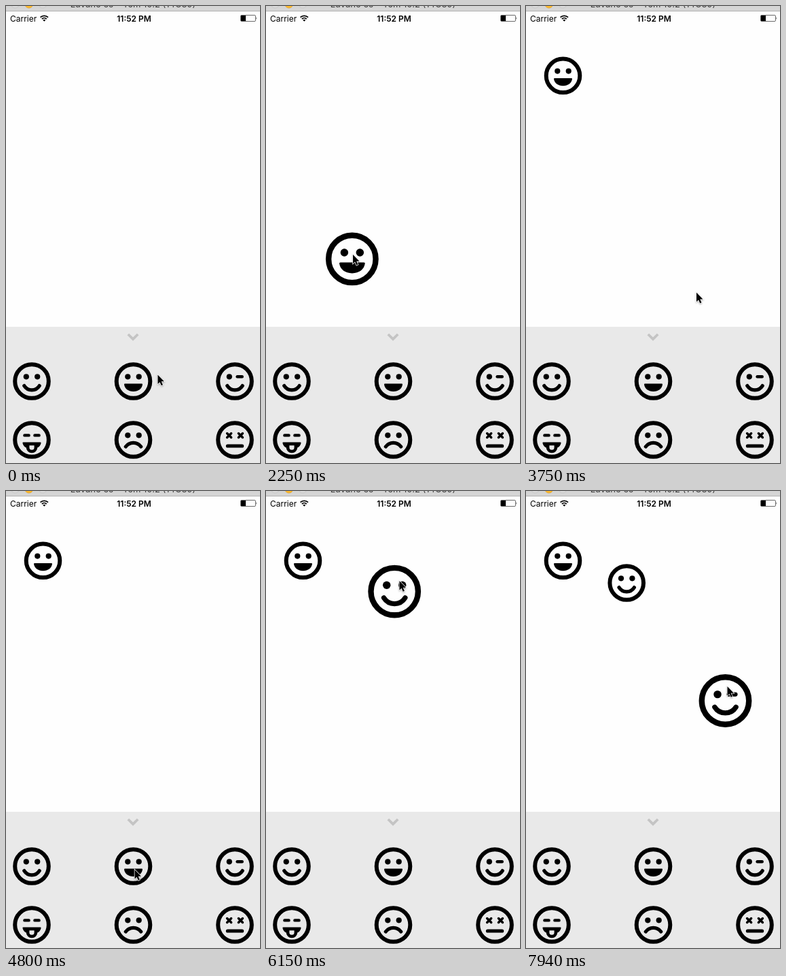
An HTML page for the animation above (8 s loop, 374 px wide and 671 px high).

```html
<!DOCTYPE html>
<html lang="en">
<head>
<meta charset="utf-8">
<title>Emoji stickers</title>
<style>
  html, body { margin: 0; width: 100%; height: 100%; overflow: hidden; background: #fefefe; }
  svg { display: block; }
  text { font-family: Inter, Roboto, "Liberation Sans", sans-serif; font-size: 12px; }
  .line { fill: none; stroke: #000; stroke-width: 5.2; stroke-linecap: round; }
  .thin { stroke-width: 4.4; }
</style>
</head>
<body>
<svg width="374" height="671" viewBox="0 0 374 671">
  <defs>
    <circle id="ring" r="24.8" fill="none" stroke="#000" stroke-width="6"/>
    <circle id="eye" r="4.1"/>
    <g id="eyes"><use href="#eye" x="-8.2" y="-6.7"/><use href="#eye" x="8.2" y="-6.7"/></g>
    <path id="smile" class="line" d="M-11.2 6.6A13.2 13.2 0 0 0 11.2 6.6"/>
    <path id="cross" class="line" style="stroke-width:3.5" d="M-3 -3L3 3M3 -3L-3 3"/>

    <g id="happy"><use href="#ring"/><use href="#eyes"/><use href="#smile"/></g>
    <g id="grin"><use href="#ring"/><use href="#eyes"/>
      <path d="M-12.4 3.6H12.4Q13.6 3.6 13.5 4.8C12.6 11 7.5 15 0 15S-12.6 11 -13.5 4.8Q-13.6 3.6 -12.4 3.6Z"/></g>
    <g id="wink"><use href="#ring"/><use href="#eye" x="-8.2" y="-6.7"/><use href="#smile"/>
      <path class="line thin" d="M3.6 -6.7H10.7"/></g>
    <g id="tongue"><use href="#ring"/>
      <path class="line thin" d="M-10.6 -6.6H-4.4M4.4 -6.6H10.6"/>
      <path fill-rule="evenodd" d="M-12.6 3.6H12.6Q13.8 3.6 13.5 4.9Q12.4 9.4 8.2 11.6A8.2 7.6 0 0 1 -8.2 11.6Q-12.4 9.4 -13.5 4.9Q-13.8 3.6 -12.6 3.6ZM-3.6 8.2V11.2A3.6 3.6 0 0 0 3.6 11.2V8.2Z"/></g>
    <g id="sad"><use href="#ring"/><use href="#eyes"/>
      <path class="line" d="M-11.2 10A14 14 0 0 1 11.2 10"/></g>
    <g id="dizzy"><use href="#ring"/>
      <use href="#cross" x="-8.4" y="-6.5"/><use href="#cross" x="8.4" y="-6.5"/>
      <path class="line" d="M-10.6 9H10.6"/></g>
  </defs>

  <rect width="374" height="671" fill="#fefefe"/>

  <!-- window title bar -->
  <rect width="374" height="7" fill="#d5d5d5"/>
  <rect y="7" width="374" height="1" fill="#b4b4b4"/>
  <g stroke-width=".8">
    <circle cx="13.5" cy="-3" r="6" fill="#dadada" stroke="#c6c6c6"/>
    <circle cx="33.8" cy="-3" r="6" fill="#fdb92c" stroke="#e5a52b"/>
    <circle cx="54" cy="-3" r="6" fill="#dadada" stroke="#c6c6c6"/>
  </g>
  <text x="187" y="2" text-anchor="middle" style="font-size:13px" fill="#3c3c3c">Luvane 6s – Tem 10.2 (14C89)</text>

  <!-- status bar -->
  <text x="6" y="22.6">Carrier</text>
  <g fill="none" stroke="#000" stroke-width="1.8">
    <path d="M50.6 16.6A8.2 8.2 0 0 1 62 16.6"/>
    <path d="M52.9 19A4.9 4.9 0 0 1 59.7 19"/>
  </g>
  <path d="M56.3 22.8L54.3 20.6A2.9 2.9 0 0 1 58.3 20.6Z"/>
  <text x="188.6" y="22.6" text-anchor="middle" font-weight="600">11:52 PM</text>
  <rect x="345.5" y="13.5" width="22" height="9" rx="1.4" fill="none" stroke="#444" stroke-width=".8"/>
  <rect x="346" y="14" width="7" height="8"/>
  <path d="M368.6 16.2Q370 18 368.6 19.8Z"/>

  <!-- sticker panel -->
  <rect y="471" width="374" height="200" fill="#e9e9e9"/>
  <path d="M179.8 482L187 489L194.2 482" fill="none" stroke="#c4c4c4" stroke-width="3.8"/>
  <g id="panel"></g>
  <g id="stickers"></g>
  <path id="cursor" d="M0 0V14.6L3.3 11.6L5.7 17.2L8.1 16.1L5.7 10.7H10.3Z" stroke="#fff" stroke-width="1.6"
    paint-order="stroke" style="filter:drop-shadow(0 1px 1px #0005)"/>
</svg>
<script>
const LOOP = 8000, STEP = 150, LAST = 7940, BIG = 1.4;

// Stops of the pointer tip: [time, x, y]
const stops = [
  [0, 223.5, 541.5], [450, 259, 504], [1350, 189.5, 554], [1800, 189.5, 554],
  [2850, 40, 94], [3000, 49.5, 97], [3150, 55.7, 95.8], [3900, 286, 479],
  [4800, 189.5, 556], [5100, 50, 558], [6000, 194.6, 188], [6150, 196.5, 132],
  [6450, 155.5, 119.4], [6900, 264, 316], [7200, 264, 316], [7350, 365, 560],
  [7500, 320, 464], [7950, 296.5, 287]
];

// A sticker hangs on the pointer at its grip from lift to rest, then shrinks
const drags = [
  { icon: "grin", lift: 1950, rest: 3150, grip: [1.2, -6.5] },
  { icon: "happy", lift: 5250, rest: 6450, grip: [7.3, -15.6] },
  { icon: "wink", lift: 7500, rest: LOOP, grip: [3, -21] }
];

const byId = id => document.getElementById(id);

function addIcon(parent, icon) {
  const node = document.createElementNS("http://www.w3.org/2000/svg", "use");
  node.setAttribute("href", "#" + icon);
  byId(parent).append(node);
  return node;
}

function place(node, x, y, scale = 1) {
  node.setAttribute("transform", `translate(${x} ${y}) scale(${scale})`);
}

["happy", "grin", "wink", "tongue", "sad", "dizzy"].forEach((icon, i) =>
  place(addIcon("panel", icon), 38 + (i % 3) * 149.5, 551 + Math.floor(i / 3) * 86));

for (const d of drags) d.node = addIcon("stickers", d.icon);

// Halfway between linear and smoothstep
const ease = k => (k + k * k * (3 - 2 * k)) / 2;

function pointerAt(t) {
  const i = Math.max(1, stops.findIndex(s => s[0] >= t));
  const [t0, x0, y0] = stops[i - 1], [t1, x1, y1] = stops[i];
  const k = ease((t - t0) / (t1 - t0));
  return [x0 + (x1 - x0) * k, y0 + (y1 - y0) * k];
}

function draw(now) {
  const ms = now % LOOP;
  const t = ms >= LAST ? LOOP - 50 : Math.floor(ms / STEP) * STEP;
  place(byId("cursor"), ...pointerAt(t), 0.92);
  for (const { node, lift, rest, grip } of drags) {
    const [x, y] = pointerAt(Math.min(t, rest));
    node.style.display = t >= lift ? "" : "none";
    place(node, x - grip[0], y - grip[1], t > rest ? 1 : BIG);
  }
}

const start = performance.now();
function tick() {
  draw(performance.now() - start);
  requestAnimationFrame(tick);
}
tick();
</script>
</body>
</html>
```
